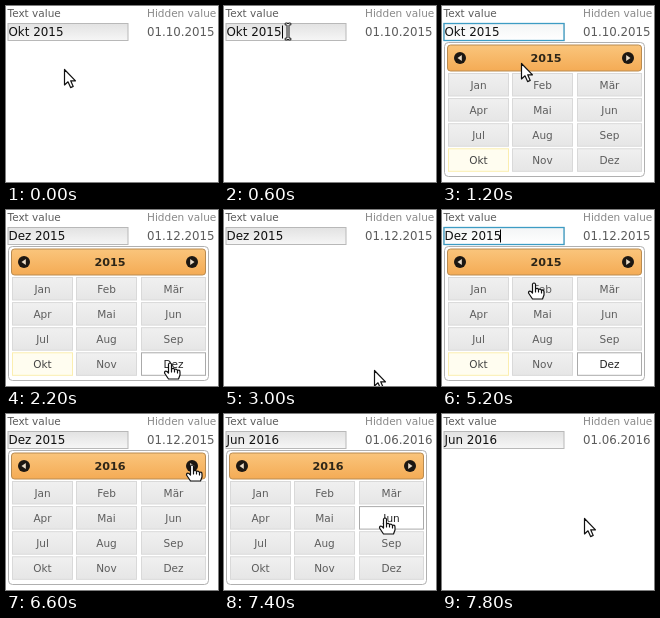
Animation of 212 by 176 pixels, one loop 8000 ms. Source, as an HTML page:

```html
<!DOCTYPE html>
<html lang="de">
<head>
<meta charset="utf-8">
<title>Month picker</title>
<style>
  html, body { margin: 0; width: 100%; height: 100%; overflow: hidden; background: #fff; }
  svg { display: block; width: 100%; height: 100%; }
  text { font: 10.5px "DejaVu Sans", Verdana, sans-serif; fill: #5c5c5c; }
  .value { font-size: 11.8px; }
  #field { font-size: 11.9px; fill: #111; }
  #year { font-size: 11.2px; font-weight: bold; fill: #2e2618; }
  #year, .cell text { text-anchor: middle; }
  .cell rect { fill: url(#button); stroke: #d9d9d9; }
  .cell.today rect { fill: #fffdf0; stroke: #fbeeb0; }
  .cell.today text { fill: #444; }
  .cell.selected rect { fill: #fff; stroke: #aaa; }
  .cell.selected text { fill: #222; }
  .bevel { fill: url(#input); stroke: #b8b8b8; }
  #focus { fill: url(#active); stroke: #3d9cc4; stroke-width: 1.3; }
</style>
</head>
<body>
<svg id="stage" viewBox="0 0 212 176">
  <defs>
    <linearGradient id="button" x2="0" y2="1">
      <stop stop-color="#f0f0f0"/><stop offset=".5" stop-color="#ebebeb"/><stop offset="1" stop-color="#e6e6e6"/>
    </linearGradient>
    <linearGradient id="input" x2="0" y2="1">
      <stop stop-color="#e2e2e2"/><stop offset="1" stop-color="#f6f6f6"/>
    </linearGradient>
    <linearGradient id="active" x2="0" y2="1">
      <stop stop-color="#f3f5f6"/><stop offset="1" stop-color="#fff"/>
    </linearGradient>
    <linearGradient id="bar" x2="0" y2="1">
      <stop stop-color="#fac57c"/><stop offset="1" stop-color="#f4ab55"/>
    </linearGradient>
  </defs>

  <text x="1.5" y="11">Text value</text>
  <text x="141" y="11" style="fill:#888">Hidden value</text>
  <rect class="bevel" x="2" y="17.5" width="120" height="17"/>
  <rect id="focus" x="2" y="17.5" width="120" height="17"/>
  <text id="field" x="2.5" y="30"></text>
  <path id="caret" d="M58.5 19.5V32.5" stroke="#000"/>
  <text id="hidden" class="value" x="141" y="30"></text>

  <g id="popup">
    <rect x="2.5" y="36.5" width="200" height="134" rx="4" fill="#fff" stroke="#b0b0b0"/>
    <rect x="5.5" y="39" width="194" height="26" rx="3" fill="url(#bar)" stroke="#b98b50"/>
    <circle cx="18" cy="52" r="6" fill="#1c1712"/>
    <path d="M19.8 49V55L15.5 52Z" fill="#eadcc8"/>
    <circle cx="186" cy="52" r="6" fill="#1c1712"/>
    <path d="M184.2 49V55L188.5 52Z" fill="#eadcc8"/>
    <text id="year" x="104" y="56"></text>
    <g id="cells"></g>
  </g>

  <g id="pointer" stroke-linejoin="round" stroke-linecap="round">
    <path id="arrow" d="M.5 .5V16L4 12.8L6.6 18.6L9.2 17.4L6.7 11.8H11.5Z" fill="#fff" stroke="#111" stroke-width="1.2"/>
    <g id="beam" fill="none">
      <path d="M-2 -7H-1L0 -6L1 -7H2M0 -6V7M-2 8H-1L0 7L1 8H2" stroke="#222" stroke-width="3"/>
      <path d="M-2 -7H-1L0 -6L1 -7H2M0 -6V7M-2 8H-1L0 7L1 8H2" stroke="#fff" stroke-width=".9"/>
    </g>
    <path id="hand" d="M-1.5 10V1Q0 -1 1.5 1V6Q3.5 4.5 4.5 6.5Q6.5 5.5 7.5 7.5Q10 6.5 10 9V12L8.5 16H-1.5L-5.5 10Q-5.5 7.5 -3 8.5Z
      M1.5 6V9M4.5 6.5V9M7.5 7.5V10" fill="#fff" stroke="#111" stroke-width="1.2"/>
  </g>
</svg>

<script>
const LOOP = 8000, STEP = 200, FADE = 400, FOCUS_FADE = 600;
const months = ["Jan", "Feb", "Mär", "Apr", "Mai", "Jun", "Jul", "Aug", "Sep", "Okt", "Nov", "Dez"];
const $ = id => document.getElementById(id);

const columns = [[6.5, 60], [70.5, 60], [135.5, 64]];
$("cells").innerHTML = months.map((name, i) => {
  const [x, width] = columns[i % 3];
  const y = 67.5 + Math.floor(i / 3) * 25.1;
  return `<g class="cell"><rect x="${x}" y="${y}" width="${width}" height="22.5"/>
    <text x="${x + width / 2}" y="${y + 15.3}">${name}</text></g>`;
}).join("");
const cells = [...$("cells").children];

// time, x, y, and the pointer shape used from that time on
const route = [
  [0, 58, 63, "arrow"], [400, 62, 26, "beam"], [800, 65, 24, "beam"],
  [1000, 71, 40, "arrow"], [1200, 79, 57, "arrow"], [1400, 95, 78, "hand"],
  [2000, 164, 152, "hand"], [2400, 164, 154, "arrow"], [3000, 150, 160, "arrow"],
  [3600, 66, 23, "beam"], [4400, 66, 23, "beam"], [4600, 70, 42, "arrow"],
  [4800, 79, 64, "hand"], [5200, 92, 73, "hand"], [6000, 186, 51, "hand"],
  [6600, 186, 51, "hand"], [7200, 164, 104, "hand"], [7600, 158, 104, "arrow"],
  [7800, 142, 104, "arrow"], [LOOP, 142, 104, "arrow"]
];

// focus and popup spans
const visits = [
  { open: 600, blur: 2200, close: 2200 },
  { open: 3800, blur: 6200, close: 7400 }
];
// time, month index, year
const values = [[0, 9, 2015], [2200, 11, 2015], [7400, 5, 2016]];

const clamp = v => Math.max(0, Math.min(1, v));
const show = (id, visible) => $(id).style.display = visible ? "" : "none";

function pointerAt(t) {
  const i = Math.max(0, route.findIndex(p => p[0] > t) - 1);
  const [t0, x0, y0, shape] = route[i], [t1, x1, y1] = route[i + 1];
  const k = (t - t0) / (t1 - t0);
  return { x: x0 + (x1 - x0) * k, y: y0 + (y1 - y0) * k, shape };
}

function draw(t) {
  const [, month, year] = values.findLast(v => v[0] <= t);
  $("field").textContent = `${months[month]} ${year}`;
  $("hidden").textContent = `01.${String(month + 1).padStart(2, "0")}.${year}`;

  const focus = visits.find(v => t >= v.open && t < v.blur);
  $("focus").style.opacity = focus ? clamp((t - focus.open) / FOCUS_FADE) : 0;
  show("caret", focus && (t - focus.open) % 1000 < 500);

  $("popup").style.opacity = Math.max(...visits.map(v =>
    Math.min(clamp((t - v.open) / FADE), 1 - clamp((t - v.close) / FADE))));

  const shownYear = t >= 6200 ? 2016 : 2015;
  $("year").textContent = shownYear;
  cells.forEach((cell, i) => {
    cell.classList.toggle("today", shownYear === 2015 && i === 9);
    cell.classList.toggle("selected", shownYear === year && i === month && i !== 9);
  });

  const { x, y, shape } = pointerAt(t);
  $("pointer").setAttribute("transform", `translate(${Math.round(x)} ${Math.round(y)})`);
  for (const id of ["arrow", "beam", "hand"]) show(id, id === shape);
}

function tick() {
  const t = performance.now() % LOOP;
  draw(Math.floor(t / STEP) * STEP);
  requestAnimationFrame(tick);
}
tick();
</script>
</body>
</html>
```
